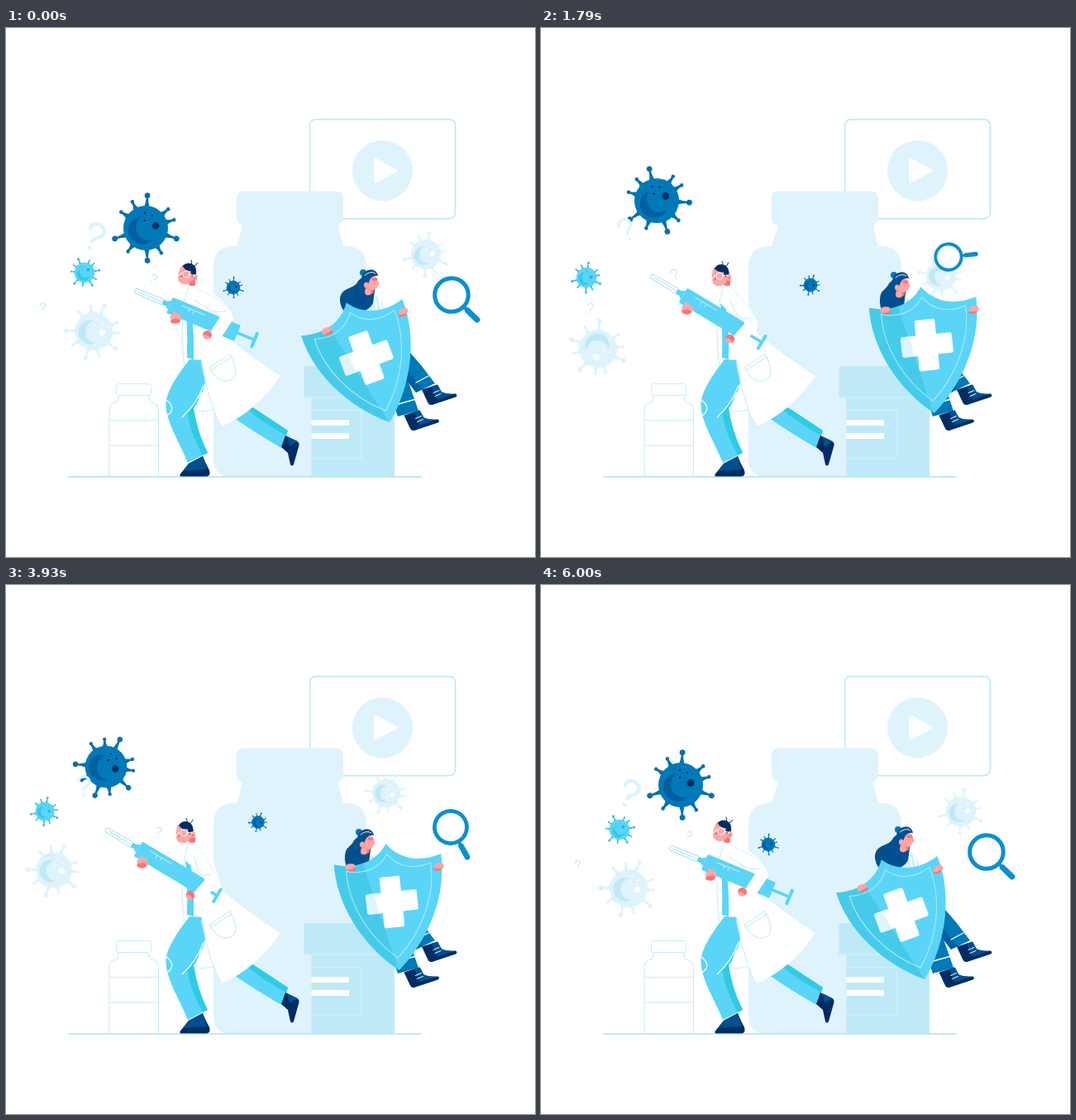
An HTML page with a canvas that plays this animation: 640 px wide and 640 px high, repeating every 6.07 s.

```html
<!DOCTYPE html>
<html lang="en">
<head>
<meta charset="utf-8">
<title>Vaccine</title>
<style>
html, body { margin: 0; width: 100%; height: 100%; overflow: hidden; background: #fff; }
canvas { display: block; width: 640px; height: 640px; }
</style>
</head>
<body>
<canvas id="stage"></canvas>
<script>
const canvas = document.getElementById('stage');
const ratio = window.devicePixelRatio || 1;
canvas.width = canvas.height = 640 * ratio;
const c = canvas.getContext('2d');

const LOOP = 6070;
const PALE = '#dff3fc', ICE = '#bfe9f6', FAINT = '#c7edf8', SKY = '#5ad5f7', TEAL = '#2fcbe5';
const BLUE = '#0079b8', SHADE = '#00609f', DEEP = '#00508f', NAVY = '#002d63';
const PINK = '#ffa6a6', RED = '#f9747d', WHITE = '#fff';

// Four eased signals drive every moving part.
const move = { first: 0, second: 0, leap: 0, guard: 0 };

const rad = a => a * Math.PI / 180;

function ease(t, from, to) {
  const u = Math.max(0, Math.min(1, (t - from) / (to - from)));
  return (1 - Math.cos(Math.PI * u)) / 2;
}

const bump = (t, a, b, d, e) => ease(t, a, b) - ease(t, d, e);

function setMotion(t) {
  move.first = bump(t, 0, 930, 1790, 3930);
  move.second = bump(t, 3140, 3930, 4640, 6000);
  move.leap = bump(t, 1790, 2600, 3450, 3930);
  move.guard = bump(t, 0, 930, 4640, 6000);
}

// Rest pose plus its offset for each signal.
const mix = (rest, first, second, leap = []) => rest.map((v, i) =>
  v + move.first * first[i] + move.second * second[i] + move.leap * (leap[i] || 0));

function at(x, y, angle, draw) {
  c.save();
  c.translate(x, y);
  c.rotate(rad(angle));
  draw();
  c.restore();
}

function fill(d, color) {
  c.fillStyle = color;
  c.fill(new Path2D(d));
}

function line(d, color, width = 1) {
  c.strokeStyle = color;
  c.lineWidth = width;
  c.stroke(new Path2D(d));
}

function oval(x, y, rx, color, ry = rx, angle = 0) {
  c.fillStyle = color;
  c.beginPath();
  c.ellipse(x, y, rx, ry, rad(angle), 0, 7);
  c.fill();
}

function box(x, y, w, h, r, color, width) {
  c.beginPath();
  c.roundRect(x, y, w, h, r);
  if (width) { c.strokeStyle = color; c.lineWidth = width; c.stroke(); }
  else { c.fillStyle = color; c.fill(); }
}

function scenery() {
  box(367.6, 110.6, 176, 120, 7, ICE, 1.6);
  oval(455.5, 172.6, 36.6, PALE);
  fill('M445 160Q445 156.5 448 158L472 170.5Q475 172.5 472 174.5L448 187Q445 188.5 445 185Z', WHITE);

  box(279, 197.5, 129, 40.5, 8, PALE);
  fill('M285 236H403L402 241 408 264H412Q436 264 436 290V543H273Q251 543 251 521V290Q251 264 276 264H279L286 241Z', PALE);

  fill('M364 409H466Q470 409 470 413V447H360.5V413Q360.5 409 364 409Z', ICE);
  fill('M369.5 447H470V543H369.5Z', ICE);
  line('M360.5 447H470M370 462.5H430V521H370', '#d2f1fa', 1.2);
  for (const y of [474, 490]) box(369.5, y, 45.5, 7, 0, WHITE);

  box(133.5, 430.5, 42, 14, 3, FAINT, 1);
  line('M136 444.5V447Q136 453 131 453.5Q125 455 125 463V539Q125 543 129 543H180Q184.5 543 184.5 539V463Q184.5 455 178 453.5Q173 453 173 447V444.5M125 474.5H184.5M125 505H184.5', FAINT, 1.1);
  line('M75 543H502.5', ICE, 2);
}

// The first four spikes are the heavy ones.
const SPIKES = [-87, 19, 87, 161, -147, -117, -40, -16, 58, 127];

function virus([x, y, angle], r, body, shade, eye, spike = body) {
  at(x, y, angle, () => {
    const k = r / 27 * (1 + .09 * move.leap - .06 * move.second);
    c.scale(k, k);
    SPIKES.forEach((a, i) => {
      const heavy = i < 4, len = heavy ? 39.5 : 35.5;
      c.save();
      c.rotate(rad(a));
      fill(`M25 -3.6Q29 -1.5 ${len} -1V1Q29 1.5 25 3.6Z`, spike);
      oval(len, 0, heavy ? 3.4 : 2.3, spike);
      c.restore();
    });
    oval(0, 0, 27, body);
    fill('M-5 -14C-18 -13 -24 -1 -20 9C-15 21 1 23 9 14C0 17 -9 12 -11 4C-13 -4 -10 -10 -5 -14Z', shade);
    oval(12, -2.5, 4.4, eye);
    for (const [dx, dy] of [[-1, -18], [8, -15], [-1, -9]]) oval(dx, dy, 1.3, eye);
  });
}

// All viruses but the stray one share the second drift.
const drift = (rest, first, spin, leap) => mix(rest, first, [-48, -22, spin], leap);

function viruses() {
  virus(drift([169, 242, 0], [-29, -33, -16], 24, [-7, 11, 13]), 27, BLUE, SHADE, NAVY, '#0870ad');
  virus(drift([95, 296, -28], [-40, 6, 33], 36, [0, 0, -10]), 12.2, SKY, TEAL, '#26b6dd', '#35bbe1');
  virus(drift([106, 367, 20], [-37, 21, 92], 0, [27, -6, -50]), 23, PALE, ICE, WHITE);
  virus(drift([508, 274, 6], [-24, 26, 22], 20, [-7, -5, -8]), 18, PALE, ICE, WHITE);
  virus(mix([275, 314, 0], [51, -3, 16], [30, -27, 16], [-4, 17, -22]), 8.3, BLUE, SHADE, NAVY, '#0870ad');
}

function ask([x, y, angle, h], color, weight) {
  at(x, y, angle, () => {
    const k = h / 34, w = weight ? weight / k : 4.4;
    c.scale(k, k);
    c.lineCap = 'round';
    line('M-9 -7C-9 -18 9 -18 9 -7C9 0 0 0 0 7', color, w);
    oval(0, 15, Math.max(2.3, w * .55), color);
  });
}

function questions() {
  ask(mix([107, 252, 24, 34], [-4, -8, -44, -6], [-13, -9, -22, -9], [-15, -12, -8, -9]), PALE);
  ask(mix([178.5, 303, 35, 11], [-17, -5, -49, 2.5], [6.5, -5, -17, 0], [-5, -6, -25]), '#c9edf8', 1.3);
  ask(mix([44.5, 338, 0, 11], [15, 1, 15, 1.5], [9, -5, 2, 5], [18, -10, 20, 3]), '#c9edf8', 1.3);
}

function magnifier() {
  const [x, y, angle, r] = mix([539, 323, 44, 20.3], [-46, -46, -50, -4.6], [-1, -30, 17, -.8], [3, -40, 42, -.3]);
  at(x, y, angle, () => {
    c.scale(r / 20.3, r / 20.3);
    oval(0, 0, 20, 'rgba(255,255,255,.6)');
    c.lineCap = 'round';
    line('M22 0H28', '#0a8fd0', 4);
    line('M27 0H43', '#0a8fd0', 7);
    line('M20.3 0A20.3 20.3 0 1 1 -20.3 0A20.3 20.3 0 1 1 20.3 0', '#0a8fd0', 5);
  });
}

function doctorBody() {
  fill('M276 472L297 458Q320 473 341 487L333 508Q302 490 276 472Z', SKY);
  fill('M290 460L297 458Q320 473 341 487L339 493Q311 478 290 460Z', TEAL);
  fill('M338 493L352 500Q355 501 354.5 505L348 528Q346 531 344 528L341 514 333 507Z', NAVY);
  fill('M340 494L353 500 343 506Z', DEEP);

  fill('M222 401C208 419 193 441 193.5 456C194 478 211 503 220 526L244 514Q231 488 227 460Q238 446 241 428V402Z', SKY);
  fill('M239 430Q236 447 227 460Q231 488 244 514L238 517Q222 488 220 467L213 471Q230 455 239 430Z', TEAL);
  line('M194 450Q207 460 195 469M239 432Q231 455 213 471', WHITE, 1.2);
  fill('M221 527L238 518Q242 528 246 535Q248 542 243 542.5H211Q209 541 213 537Z', NAVY);
  fill('M221 527L238 518 243 534 214 536Z', DEEP);

  fill('M236 441L230 458Q229 464 235 464L250 462 246 440Z', WHITE);
  line('M236 441L230 458Q229 464 235 464L250 462', FAINT, 1);
  fill('M222 309C214 320 212 365 215 409L222 400H236C242 430 250 465 261 482Q303 464 332 421Q296 398 262 370L252 337Q240 312 230 310Z', WHITE);
  line('M222 310C211 335 212 382 216 409M236 405C242 433 250 466 261 482', FAINT, 1);
  fill('M217 333L224 340Q228 370 227 401L219 399Q220 360 217 333Z', SKY);
  line('M246 411L271 394.5Q276 403 278 414C278 429 263 431 253 421Q248 416 246 411ZM248 414L273 398', ICE, 1);
}

function doctorHead() {
  const [x, y, angle] = mix([218, 298, 10], [-2, 2, -11], [-3, 2, -10]);
  fill('M221 303L229 305 229 311Q224 314 221 310Z', RED);
  at(x, y, angle, () => {
    fill('M-7 -10C-10 -3 -10 4 -8 9Q-4 13 2 12Q9 9 10 1L9 -9Z', PINK);
    fill('M-6 -9C-3 -16 9 -16 11 -7Q13 0 10 3Q5 1 5 -5Q-1 -3 -6 -9Z', NAVY);
    oval(-6, 3, 2, RED);
    oval(11, 2, 3.2, PINK, 4);
    oval(11, 3, 1.3, RED);
    c.lineCap = 'round';
    line('M4 -12Q5 -16 3 -18M7 -11Q10 -12 11 -16', NAVY, .9);
    line('M4 0A4 4 0 1 1 -4 0A4 4 0 1 1 4 0M-6 -1A3 3.5 0 1 1 -9 -4M4 -1L10 0', WHITE, 1.1);
  });
}

function doctorArms() {
  const [x, y, angle] = mix([198, 335, 22.5], [-26, -12, 8.5], [-38, -16, 8.3]);
  const grip = 67 + 20 * move.first + 27 * move.second;
  at(x, y, angle, () => {
    oval(grip - 11, 16, 5.5, RED, 5);
    oval(grip - 11, 19, 4, PINK, 2.5);
    fill('M-46 -2.5L-9 -4V4L-46 2.5Z', WHITE);
    c.lineCap = 'round';
    line('M-9 -3.5L-44 -2.8Q-48 0 -44 2.8L-9 3.5M-40 0H-10', '#a5e1f4', 1);
    fill('M-9 -3H-4L0 -6V6L-4 3H-9Z', SKY);
    line('M88 0H111', SKY, 3.5);
    line('M111 -8.5V8.5', SKY, 4);
    box(0, -10, 89, 20.5, 1.5, SKY);
    line('M14 -5H44M24 -1V-5M30 -1V-5', '#c7f0fc', 1);
    oval(13, 12, 7, PINK, 4.5, -12);
    oval(14, 15.5, 6, RED, 3, -25);
    line('M8 7L17 8', PINK, 3.5);
  });

  // The sleeve follows the grip as it slides along the barrel.
  const s = Math.sin(rad(angle)), k = Math.cos(rad(angle));
  const place = (u, v) => [x + u * k - v * s, y + u * s + v * k];
  const [ex, ey] = place(grip + 3, -12), [wx, wy] = place(grip - 1, 8);
  c.lineCap = c.lineJoin = 'round';
  line(`M231 321Q${ex - 10} ${ey - 22} ${ex} ${ey}L${wx} ${wy}`, WHITE, 15);
  line(`M228 313C239 320 ${ex - 8} ${ey - 24} ${ex + 4} ${ey - 10}`, '#d4f1fa', .8);
  line(`M228 329Q${ex - 17} ${ey - 6} ${ex - 11} ${ey - 7}L${ex - 2} ${ey - 8}`, ICE, 1);
}

function boot(x, y) {
  fill(`M${x} ${y}l19 -6 5 9q7 3 17 2q3 2 0 4l-27 9q-5 2 -7 -3z`, NAVY);
  fill(`M${x + 12} ${y - 4}l7 -2 5 9q7 3 17 2l-22 7z`, DEEP);
  c.lineCap = 'round';
  line(`M${x + 14} ${y + 4}l7 -3m-5 7l7 -3`, WHITE, 1);
}

function womanLegs() {
  const k = move.leap;
  at(10 * k, -17 * k, 0, () => {
    fill('M458 425L484 420 499 463 474 470Z', BLUE);
    line('M471 456L496 449', WHITE, 1.3);
    boot(481.5, 468.5);
  });
  at(24 * k, -20 * k, 0, () => {
    fill('M465 400L485 388Q503 408 519 430L496 441Z', BLUE);
    fill('M465 400L479 407 504 437 496 441Z', SHADE);
    line('M496 429L511 421', WHITE, 1.3);
    boot(503, 437.5);
  });
}

function womanUpper() {
  const g = move.guard;
  at(442 - 5 * g, 308 + 3 * g, 0, () => {
    fill('M-4 14Q12 13 15 31L11 42H-20Z', '#d4f1fa');
    line('M3 14L8 39M9 17L13 35', WHITE, 1.8);
    const back = -38 + 11 * g;
    fill(`M-6 -9Q-15 -5 -17 0C-23 9 ${back} 5 ${back} 22Q${back + 2} 37 ${back + 12} 36Q-5 38 2 25L5 3Z`, DEEP);
    fill('M-7 5H3V12Q-4 18 -8 13Z', RED);
    oval(1, 0, 7.5, PINK, 9, -8);
    fill('M7 -4l3 6l-4 3z', PINK);
    oval(4, -4, 3.5, RED, 1.8);
    oval(-10, -12, 4, BLUE);
    fill('M-12 -2C-13 -18 6 -18 8 -8Q-2 -10 -4 4Z', DEEP);
    oval(-6, 3, 3, PINK, 3.6);
    oval(-4, 11, 3.8, PINK, 4.3);
    c.lineCap = 'round';
    line('M-5 -14Q4 -18 7 -10', NAVY, 1);
    line('M-8 -9Q-1 -15 5 -11', '#d4f1fa', 1);
  });
}

const SHIELD = 'M-65 -52C-40 -44 -14 -50 0 -71C14 -50 40 -44 65 -52C67 -5 42 48 0 83C-42 48 -67 -5 -65 -52Z';

function hand(x, y, side) {
  oval(x, y, 6, PINK, 4.3);
  oval(x - side * 2, y + 3, 5, RED, 2);
  c.lineCap = 'round';
  line(`M${x - 4} ${y + 1}h6m-5 -3h7`, PINK, 3.2);
}

function cross(color) {
  box(-31, -12.3, 62, 24.6, 2.5, color);
  box(-12.3, -31, 24.6, 62, 2.5, color);
}

function shield() {
  const g = move.guard, k = move.leap;
  at(436 + 31 * g, 399 - 15.5 * g - 25 * k, -20 + 14 * g, () => {
    fill(SHIELD, SKY);
    c.save();
    c.clip(new Path2D(SHIELD));
    fill('M-80 -75H-34L-29 -45 0 86H-80Z', '#45cbe9');
    c.restore();
    c.save();
    c.scale(.79, .82);
    line(SHIELD, '#b9ecfb', 1.2);
    c.restore();
    cross(WHITE);
    c.save();
    c.clip(new Path2D('M-32 -32H-23L-14 32H-32Z'));
    cross('#def5fc');
    c.restore();
    hand(-34 - 12 * g - 8 * k, -47, -1);
    hand(61, -37, 1);
  });
}

function frame(t) {
  setMotion(t);
  c.setTransform(ratio, 0, 0, ratio, 0, 0);
  c.lineCap = 'butt';
  c.lineJoin = 'miter';
  box(0, 0, 640, 640, 0, WHITE);

  scenery();
  viruses();
  questions();
  magnifier();
  doctorBody();
  doctorArms();
  doctorHead();
  womanLegs();
  womanUpper();
  shield();
}

const start = performance.now();
function tick() {
  frame((performance.now() - start) % LOOP);
  requestAnimationFrame(tick);
}
tick();
</script>
</body>
</html>
```
